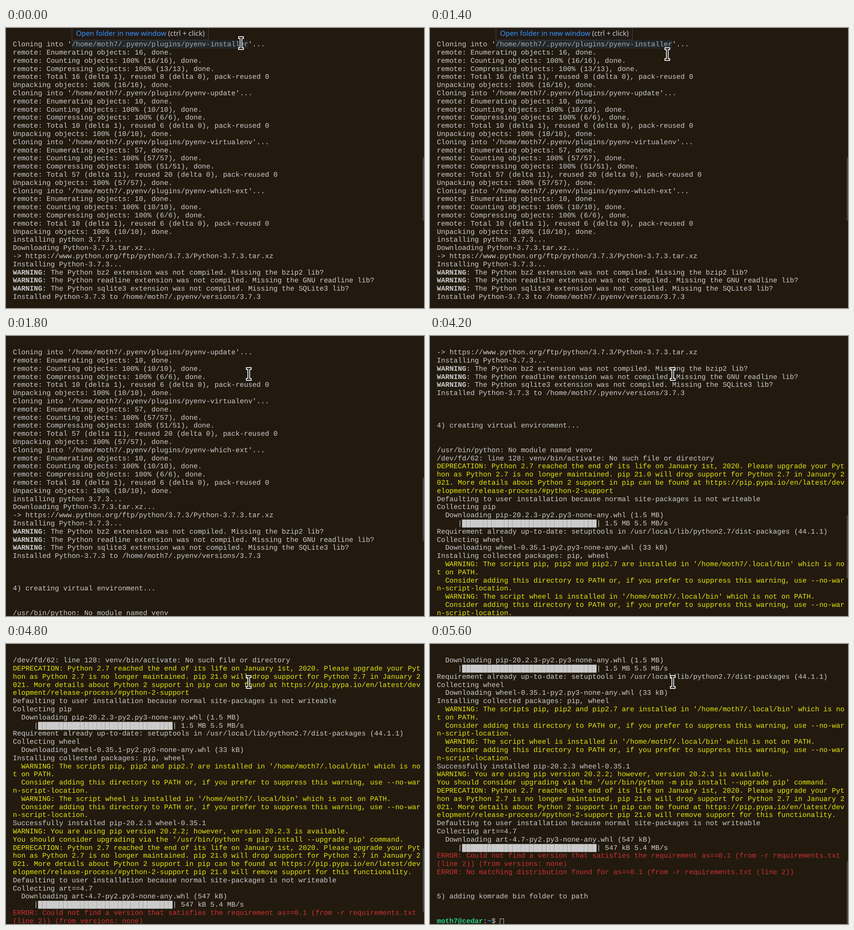
Recreate the animation shown at these times as an HTML page. Size 916 by 612 pixels, loop 8 s.

```html
<!DOCTYPE html>
<html lang="en">
<head>
<meta charset="utf-8">
<title>Terminal install log</title>
<style>
  :root { --h: 17.797px; }
  html, body { margin: 0; width: 100%; height: 100%; overflow: hidden; background: #221a0f; }
  #stage {
    position: relative; width: 916px; height: 612px; overflow: hidden;
    background: #221a0f; color: #ccc; text-rendering: geometricPrecision;
  }
  #stage * { animation-duration: 8s; animation-timing-function: step-end; animation-iteration-count: infinite; }

  /* The tiny turn keeps baselines from snapping to whole pixels. */
  #term {
    position: absolute; left: 0; top: 27px; width: 916px; height: 585px;
    overflow: hidden; transform: rotate(.002deg);
  }
  pre {
    position: absolute; left: 15px; top: 1.2px; margin: 0;
    font: 15.35px/var(--h) "Liberation Mono", "Courier New", monospace;
    animation-name: scroll;
  }
  .y { color: #e5e510; }
  .r { color: #cd3131; }
  .g { color: #23d18b; }
  .b { color: #3b8eea; }
  .caret {
    display: inline-block; box-sizing: border-box; width: 9.2px; height: 15px;
    border: 1px solid #ccc; vertical-align: -2.5px; margin: -3px 0;
  }

  #link {
    position: absolute; left: 144px; top: 27px; width: 387px; height: 18px;
    background: rgba(38, 79, 120, .25); animation-name: leave;
  }
  #tip {
    position: absolute; left: 144px; top: -4px; width: 300px; height: 31px;
    box-sizing: border-box; border: 1px solid #454545; background: #221a14;
    padding-left: 8.5px; white-space: pre;
    font: 15.35px/30px "Noto Sans", "Open Sans", sans-serif;
    animation-name: leave;
  }
  #tip span { color: #3794ff; }
  #thumb {
    position: absolute; left: 913px; top: 283px; width: 3px; height: 138px;
    background: rgba(121, 121, 121, .4); animation-name: thumb;
  }
  #mouse { position: absolute; left: 505px; top: 17px; width: 20px; height: 32px; animation-name: mouse; }

  @keyframes scroll {
    0% { top: 1.2px; }
    22.5% { top: calc(1.2px - var(--h) * 6); }
    52.5% { top: calc(1.2px - var(--h) * 26); }
    57.5% { top: calc(1.2px - var(--h) * 33); }
    60% { top: calc(1.2px - var(--h) * 39); }
    70%, 100% { top: calc(1.2px - var(--h) * 46); }
  }
  @keyframes thumb {
    0% { top: 283px; }
    22.5% { top: 310px; }
    52.5% { top: 392px; }
    57.5% { top: 419px; }
    60% { top: 447px; }
    70%, 100% { top: 474px; }
  }
  @keyframes leave {
    0% { visibility: visible; }
    18.75%, 100% { visibility: hidden; }
  }
  @keyframes mouse {
    0% { left: 505px; top: 17px; }
    17.5% { left: 509.5px; top: 41px; }
    18.75% { left: 518px; top: 59px; }
    20%, 100% { left: 522px; top: 67px; }
  }
</style>
</head>
<body>
<div id="stage">
<div id="term"><pre>
Cloning into '/home/moth7/.pyenv/plugins/pyenv-installer'...
remote: Enumerating objects: 16, done.
remote: Counting objects: 100% (16/16), done.
remote: Compressing objects: 100% (13/13), done.
remote: Total 16 (delta 1), reused 8 (delta 0), pack-reused 0
Unpacking objects: 100% (16/16), done.
Cloning into '/home/moth7/.pyenv/plugins/pyenv-update'...
remote: Enumerating objects: 10, done.
remote: Counting objects: 100% (10/10), done.
remote: Compressing objects: 100% (6/6), done.
remote: Total 10 (delta 1), reused 6 (delta 0), pack-reused 0
Unpacking objects: 100% (10/10), done.
Cloning into '/home/moth7/.pyenv/plugins/pyenv-virtualenv'...
remote: Enumerating objects: 57, done.
remote: Counting objects: 100% (57/57), done.
remote: Compressing objects: 100% (51/51), done.
remote: Total 57 (delta 11), reused 20 (delta 0), pack-reused 0
Unpacking objects: 100% (57/57), done.
Cloning into '/home/moth7/.pyenv/plugins/pyenv-which-ext'...
remote: Enumerating objects: 10, done.
remote: Counting objects: 100% (10/10), done.
remote: Compressing objects: 100% (6/6), done.
remote: Total 10 (delta 1), reused 6 (delta 0), pack-reused 0
Unpacking objects: 100% (10/10), done.
installing python 3.7.3...
Downloading Python-3.7.3.tar.xz...
-&gt; https://www.python.org/ftp/python/3.7.3/Python-3.7.3.tar.xz
Installing Python-3.7.3...
<b>WARNING</b>: The Python bz2 extension was not compiled. Missing the bzip2 lib?
<b>WARNING</b>: The Python readline extension was not compiled. Missing the GNU readline lib?
<b>WARNING</b>: The Python sqlite3 extension was not compiled. Missing the SQLite3 lib?
Installed Python-3.7.3 to /home/moth7/.pyenv/versions/3.7.3



4) creating virtual environment...


/usr/bin/python: No module named venv
/dev/fd/62: line 128: venv/bin/activate: No such file or directory
<span class="y">DEPRECATION: Python 2.7 reached the end of its life on January 1st, 2020. Please upgrade your Pyt
hon as Python 2.7 is no longer maintained. pip 21.0 will drop support for Python 2.7 in January 2
021. More details about Python 2 support in pip can be found at https://pip.pypa.io/en/latest/dev
elopment/release-process/#python-2-support</span>
Defaulting to user installation because normal site-packages is not writeable
Collecting pip
  Downloading pip-20.2.3-py2.py3-none-any.whl (1.5 MB)
     |████████████████████████████████| 1.5 MB 5.5 MB/s
Requirement already up-to-date: setuptools in /usr/local/lib/python2.7/dist-packages (44.1.1)
Collecting wheel
  Downloading wheel-0.35.1-py2.py3-none-any.whl (33 kB)
Installing collected packages: pip, wheel
<span class="y">  WARNING: The scripts pip, pip2 and pip2.7 are installed in '/home/moth7/.local/bin' which is no
t on PATH.
  Consider adding this directory to PATH or, if you prefer to suppress this warning, use --no-war
n-script-location.
  WARNING: The script wheel is installed in '/home/moth7/.local/bin' which is not on PATH.
  Consider adding this directory to PATH or, if you prefer to suppress this warning, use --no-war
n-script-location.</span>
Successfully installed pip-20.2.3 wheel-0.35.1
<span class="y">WARNING: You are using pip version 20.2.2; however, version 20.2.3 is available.
You should consider upgrading via the '/usr/bin/python -m pip install --upgrade pip' command.
DEPRECATION: Python 2.7 reached the end of its life on January 1st, 2020. Please upgrade your Pyt
hon as Python 2.7 is no longer maintained. pip 21.0 will drop support for Python 2.7 in January 2
021. More details about Python 2 support in pip can be found at https://pip.pypa.io/en/latest/dev
elopment/release-process/#python-2-support pip 21.0 will remove support for this functionality.</span>
Defaulting to user installation because normal site-packages is not writeable
Collecting art==4.7
  Downloading art-4.7-py2.py3-none-any.whl (547 kB)
     |████████████████████████████████| 547 kB 5.4 MB/s
<span class="r">ERROR: Could not find a version that satisfies the requirement as==0.1 (from -r requirements.txt
(line 2)) (from versions: none)
ERROR: No matching distribution found for as==0.1 (from -r requirements.txt (line 2))</span>


5) adding komrade bin folder to path


<b class="g">moth7@cedar</b>:<b class="b">~</b>$ <i class="caret"></i></pre></div>
<div id="link"></div>
<div id="tip"><span>Open folder in new window</span> (ctrl + click)</div>
<div id="thumb"></div>
<svg id="mouse" viewBox="-10 -16 20 32" fill="none" stroke-linecap="square">
  <defs><path id="beam" d="M0 -11.5V11.5M-3.4 -11.9H3.4M-3.4 11.9H3.4"/></defs>
  <use href="#beam" stroke="#fff" stroke-width="5.6"/>
  <use href="#beam" stroke="#111" stroke-width="2.2"/>
</svg>
</div>
</body>
</html>
```
